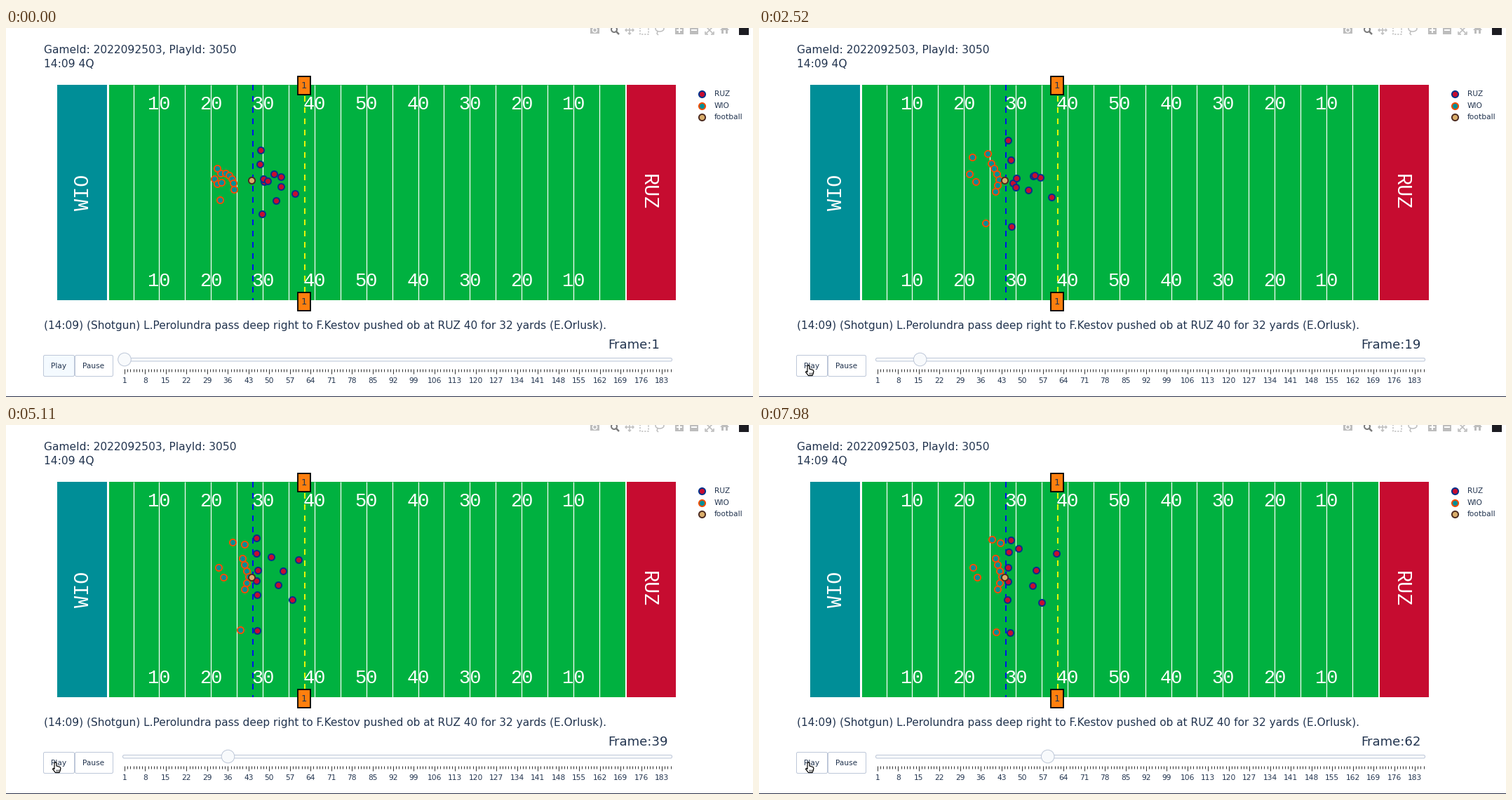
Write a matplotlib script that moves like this. It is 1065 by 526 pixels and loops after 8 s.

```python
import numpy as np
import matplotlib.pyplot as plt
from matplotlib.animation import FuncAnimation
from matplotlib.collections import LineCollection
from matplotlib.patches import Circle, FancyBboxPatch, Polygon, Rectangle

W, H, DPI = 1065, 526, 100
LOOP, STEP = 8000, 50
CLICK, KICKOFF = 210, 420
INK, BORDER, PALE, GREY = "#22344f", "#bec8d9", "#f8fafc", "#bdbdbd"
TEAL, RED, GRASS = "#008e97", "#c60c30", "#00b140"
ORANGE, NAVY = "#fc4c02", "#00338d"
HOME, AWAY = "WIO", "RUZ"

fig = plt.figure(figsize=(W / DPI, H / DPI), dpi=DPI, facecolor="white")
ax = fig.add_axes([0, 0, 1, 1])
ax.set_xlim(0, W)
ax.set_ylim(H, 0)
ax.axis("off")


def pt(px):
    return px * 72 / DPI


def text(x, y, s, size, color=INK, ha="left", font="DejaVu Sans", z=5):
    """Write s with its capitals centred on y."""
    return ax.text(x, y + 0.365 * size, s, fontsize=pt(size), color=color,
                   ha=ha, va="baseline", family=font, zorder=z)


def rect(x0, y0, x1, y1, fill, edge="none", lw=0, z=1):
    return ax.add_patch(Rectangle((x0, y0), x1 - x0, y1 - y0, facecolor=fill,
                                  edgecolor=edge, linewidth=pt(lw), zorder=z))


def rounded(x0, y0, x1, y1, r, fill):
    box = FancyBboxPatch((x0 + r, y0 + r), x1 - x0 - 2 * r, y1 - y0 - 2 * r,
                         boxstyle=f"round,pad={r}", facecolor=fill,
                         edgecolor=BORDER, linewidth=pt(1), zorder=4)
    return ax.add_patch(box)


def strokes(segments, color, lw, z=2):
    lines = LineCollection(segments, colors=color, linewidths=pt(lw), zorder=z)
    return ax.add_collection(lines)


def dots(points, fill, edge, z):
    return ax.scatter(*np.transpose(points), s=pt(9.2) ** 2, facecolor=fill,
                      edgecolor=edge, linewidth=pt(1.9), zorder=z)


# field
TOP, BOTTOM, GOAL, YARD = 81, 387.5, 144.6, 7.383
rect(72.5, TOP, 144, BOTTOM, TEAL)
rect(146.5, TOP, 883, BOTTOM, GRASS)
rect(884.5, TOP, 955, BOTTOM, RED)
strokes([[(GOAL + YARD * n, TOP), (GOAL + YARD * n, BOTTOM)]
         for n in range(5, 100, 5)], "white", 1.2)

MONO = 27
for n in range(10, 100, 10):
    for y in (107.5, 359.5):
        text(GOAL + YARD * n, y - 1, str(min(n, 100 - n)), MONO, "white",
             "center", "Liberation Mono", 3)
for base, name, turn in ((117.5, HOME, 90), (908, AWAY, -90)):
    ax.text(base, 234, name, fontsize=pt(28.5), color="white",
            family="Liberation Mono", rotation=turn, rotation_mode="anchor",
            ha="center", va="baseline", zorder=3)

DASH = 8 / 1.8
for x, color in ((351.5, "#0000ff"), (425.5, "#ffff00")):
    ax.plot([x, x], [TOP, 388], color=color, linewidth=pt(1.8),
            dashes=(DASH, DASH), dash_capstyle="butt", zorder=3)
for y in (81.5, 389.5):
    rect(416, y - 13, 434, y + 13, "#ff7f0e", "black", 1.8, 4)
    text(425, y, "1", 13, ha="center")

# titles and legend
text(53.5, 30, "GameId: 2022092503, PlayId: 3050", 15.5)
text(53.5, 50, "14:09 4Q", 15.5)
text(53.5, 423, f"(14:09) (Shotgun) L.Perolundra pass deep right to F.Kestov "
     f"pushed ob at {AWAY} 40 for 32 yards (E.Orlusk).", 15.43)
STYLES = {AWAY: (RED, NAVY), HOME: (TEAL, ORANGE),
          "football": ("#d9ad6a", "#4b2a20")}
for i, (name, style) in enumerate(STYLES.items()):
    y = 93.7 + 16.8 * i
    dots([(992, y)], *style, 5)
    text(1010, y - 0.7, name, 10.6)

# toolbar, cut by the top edge
rect(833, -2, 846, 8, GREY)
ax.add_patch(Circle((839.5, 3), 3, facecolor=GREY, edgecolor="white",
                    linewidth=pt(1.5), zorder=2))
ax.add_patch(Circle((867, 2), 4, facecolor="none", edgecolor="#7a7a7a",
                    linewidth=pt(2), zorder=2))
strokes([[(870, 5), (874, 9)]], "#7a7a7a", 2.5)
strokes([[(883, 3), (895, 3)], [(889, -3), (889, 9)],
         [(887, 7), (889, 9), (891, 7)], [(885, 1), (883, 3), (885, 5)],
         [(893, 1), (895, 3), (893, 5)]], GREY, 1.5)
ax.plot([904, 904, 916, 916], [-2, 9, 9, -2], color=GREY, linewidth=pt(1.5),
        dashes=(1.5, 1.2), zorder=2)
a = np.linspace(-0.5, 3.9, 24)
strokes([np.c_[932 + 6 * np.cos(a), 1 + 4 * np.sin(a)],
         [(929, 5), (928, 8), (930, 10)]], GREY, 1.5)
for x in (960, 981):
    rect(x - 6, -3, x + 6, 9, GREY)
    strokes([[(x - 4, 3), (x + 4, 3)]], "white", 2, 3)
strokes([[(960, -1), (960, 7)]], "white", 2, 3)
strokes([[(998, -2), (1008, 8)], [(998, 8), (1008, -2)],
         [(997, 5), (997, 9), (1001, 9)],
         [(1005, 9), (1009, 9), (1009, 5)]], GREY, 1.6)
ax.add_patch(Polygon([(1018, 3), (1025, -4), (1031, 3)], facecolor=GREY, zorder=2))
for x in (1020, 1026):
    rect(x, 2, x + 3, 8, GREY)
rect(1045, -4, 1059, 10, "#1c1c22")
rect(0, 525, W, 526, "#2b3148")

# controls
play = rounded(53.5, 466.5, 97.5, 496.5, 2, "white")
rounded(98.5, 466.5, 152.5, 496.5, 2, "white")
text(75, 481, "Play", 10.6, ha="center")
text(125, 481, "Pause", 10.6, ha="center")

FIRST, PITCH, COUNT = 169, 4.209, 186
rounded(166.5, 470.5, 949.5, 475, 2, PALE)
strokes([[(FIRST + PITCH * n, 486), (FIRST + PITCH * n, 489.5 if n % 7 else 493)]
         for n in range(COUNT)], "#333333", 1)
for n in range(0, COUNT, 7):
    text(FIRST + PITCH * n, 502.3, str(n + 1), 10.6, ha="center")
handle = ax.add_patch(Circle((FIRST, 472.5), 9.3, facecolor=PALE,
                             edgecolor=BORDER, linewidth=pt(1), zorder=6))
counter = text(858.5, 450.3, "Frame:1", 18.1)
hand = ax.add_patch(Polygon(
    [(69, 482), (70.5, 480.5), (72, 482), (72, 486), (77, 487.5), (78, 489.5),
     (77, 493), (76, 495.5), (70.5, 495.5), (66.5, 490.5), (67.5, 489.3),
     (69, 490.5)], facecolor="white", edgecolor="black", linewidth=pt(1.2),
    joinstyle="round", zorder=8))
fingers = strokes([[(x, 490.5), (x, 493.5)] for x in (71.5, 73.5, 75.5)],
                  "black", 0.8, 9)

routes = {name: [] for name in STYLES}


def run(team, start, end, via=None):
    """Route from start to end, bent through via at half its eased length."""
    start, end = np.array(start, float), np.array(end, float)
    middle = (start + end) / 2 if via is None else np.array(via, float)
    routes[team].append((start, 2 * middle - (start + end) / 2, end))


# the line leaves the huddle and forms a wedge
for i in range(6):
    start = np.array([306 + 7.6 * i - 0.75 * i * i, 206.5 + 0.92 * i * i])
    end = np.array([346 - 3 * abs(i - 3), 190 + 8.8 * i])
    run(HOME, start, end, start + 0.82 * (end - start))
run(HOME, (301, 200), (344, 168), (326, 179))
run(HOME, (297, 215), (332, 163), (304, 184))
run(HOME, (305, 245), (338, 295), (323, 278))
run(HOME, (301, 222), (305, 203), (300, 208))
run(HOME, (307, 220), (311, 217))

run(AWAY, (363, 174), (359, 164), (355, 160))
run(AWAY, (362, 194), (356, 181))
run(AWAY, (382, 208), (370, 176), (391, 211))
run(AWAY, (392, 226), (424, 183), (401, 213))
run(AWAY, (392, 212), (395, 207))
run(AWAY, (368, 219), (355, 223))
run(AWAY, (367, 215), (355, 203), (367, 214))
run(AWAY, (373, 218), (354, 249), (366, 227))
run(AWAY, (385, 246), (390, 229), (384, 231))
run(AWAY, (412, 236), (403, 253), (417, 241))
run(AWAY, (365, 265), (358, 296), (360, 283))

run("football", (350, 217), (349.5, 216.5))


def places(team, t):
    """Quadratic curves walked with an ease-out."""
    s = np.clip((t - KICKOFF) / (LOOP - KICKOFF), 0, 1)
    u = 1 - (1 - s) ** 2.13
    return [(1 - u) ** 2 * p + 2 * u * (1 - u) * q + u * u * r
            for p, q, r in routes[team]]


marks = {team: dots(places(team, 0), *style, 5 + 0.1 * i)
         for i, (team, style) in enumerate(STYLES.items())}


def draw(k):
    t = k * STEP + STEP / 2
    clock = 12.4 + (t - 1680) / 126 if t >= KICKOFF else 1
    for team, mark in marks.items():
        mark.set_offsets(places(team, t))
    counter.set_text(f"Frame:{int(clock)}")
    handle.center = (FIRST + PITCH * max(clock - 4.7, 0), 472.5)
    clicked = t >= CLICK
    play.set_facecolor("white" if clicked else "#f4faff")
    hand.set_visible(clicked)
    fingers.set_visible(clicked)
    return [*marks.values(), counter, handle, play, hand, fingers]


anim = FuncAnimation(fig, draw, frames=LOOP // STEP, interval=STEP,
                     repeat=True, repeat_delay=0, blit=False)
plt.show()
```
